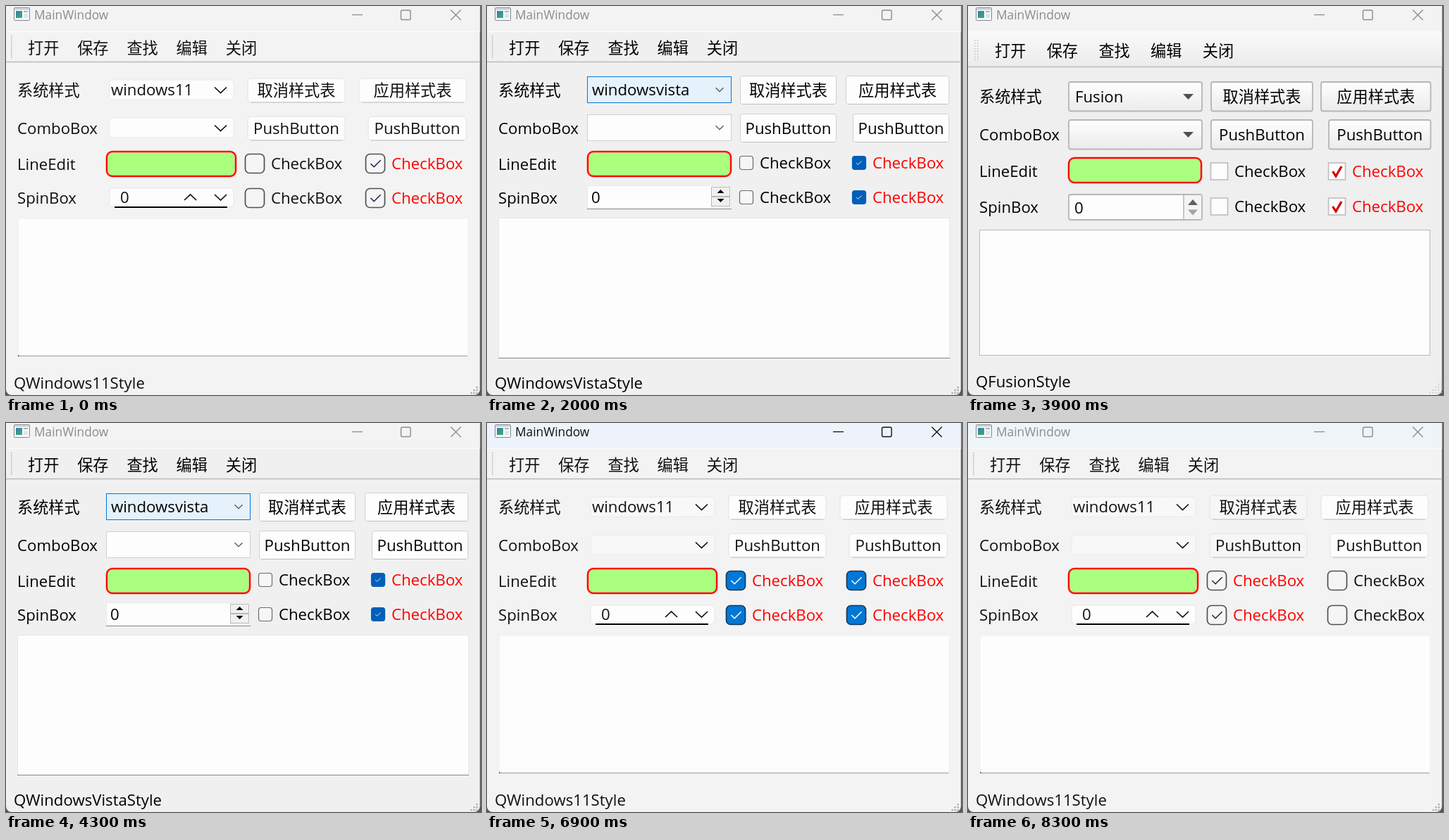
Write an HTML page that moves like this. It is 674 px wide and 553 px high and loops after 8.4 s.

```html
<!DOCTYPE html>
<html lang="zh-CN">
<head>
<meta charset="utf-8">
<title>MainWindow</title>
<style>
html, body { margin: 0; width: 100%; height: 100%; overflow: hidden; background: #555; }
svg { display: block; width: 674px; height: 553px; fill: none; }
text { font: 22.2px "Open Sans", "Noto Sans CJK SC", "Noto Sans CJK", sans-serif; }
.title { font-size: 17.3px; }
</style>
</head>
<body>
<svg id="stage" viewBox="0 0 674 553">
  <defs>
    <linearGradient id="raised" x2="0" y2="1"><stop stop-color="#fefefe"/><stop offset="1" stop-color="#ebebeb"/></linearGradient>
    <linearGradient id="bar" x2="0" y2="1"><stop stop-color="#fafafa"/><stop offset="1" stop-color="#ebebeb"/></linearGradient>
    <linearGradient id="icon" x2="1" y2="1"><stop stop-color="#3d78b4"/><stop offset="1" stop-color="#35b56a"/></linearGradient>
  </defs>
  <g id="view"></g>
</svg>
<script>
const LOOP = 8400;
const view = document.getElementById("view");
const RED = "#ff0000";

const rect = (x1, y1, x2, y2, fill, stroke = "none", r = 0, w = 1) =>
  `<rect x="${x1}" y="${y1}" width="${x2 - x1}" height="${y2 - y1}" rx="${r}" fill="${fill}" stroke="${stroke}" stroke-width="${w}"/>`;
const path = (d, stroke, w = 1.5, fill = "none") =>
  `<path d="${d}" stroke="${stroke}" stroke-width="${w}" fill="${fill}"/>`;
const text = (x, cy, s, fill, anchor = "start") =>
  `<text x="${x}" y="${cy + 8}" fill="${fill}" text-anchor="${anchor}">${s}</text>`;
const chevron = (cx, cy, w, h, color = "#111", lw = 1.7) =>
  path(`M${cx - w} ${cy - h}L${cx} ${cy + h}L${cx + w} ${cy - h}`, color, lw);
const triangle = (cx, cy, w, h, color) =>
  path(`M${cx - w} ${cy - h}H${cx + w}L${cx} ${cy + h}Z`, "none", 0, color);
const tick = (cx, cy, s, color, w = 1.5) =>
  path(`M${cx - 8 * s} ${cy}l${5 * s} ${5 * s}l${10 * s} ${-10 * s}`, color, w);

function dots(x, y, cols, rows, step, size, color, keep = () => true) {
  let d = "";
  for (let i = 0; i < cols; i++)
    for (let j = 0; j < rows; j++)
      if (keep(i, j)) d += `M${x + i * step} ${y + j * step}h${size}v${size}h${-size}z`;
  return path(d, "none", 0, color);
}

// Layout and painting rules of each widget style
const styles = {
  win11: {
    name: "windows11", status: "QWindows11Style", body: "#f3f3f3", ink: "#101010",
    rows: [120, 174, 225, 273], statusY: 536, menu: [31, 70.2, 60], lineY: 80,
    edit: [143, 207, 326, 242], comboText: [149, 119], spinText: [162, 272],
    checkX: [353, 524], checkY: [224, 273], labelX: [376, 547],
    buttons: [[343, 103, 481, 137], [501, 103, 653, 137], [343, 157, 481, 191], [514, 157, 653, 191]],
    button: ([x1, y1, x2, y2], i, s) =>
      rect(x1, y1, x2, y2, s.late && i % 2 === 0 ? "#f6f6f6" : "#fdfdfd", "#e2e2e2", 5) +
      path(`M${x1 + 4} ${y2}H${x2 - 4}`, "#c2c2c2", 1.2),
    combo: (i, s) => {
      const y = 105 + 54 * i;
      return rect(147, y, 323, y + 28, s.dimCombo ? "#f8f8f8" : "#fdfdfd", "#eaeaea", 5) + chevron(304.5, y + 14.5, 8.5, 4);
    },
    spin: () => rect(147, 259, 323, 286, "#fdfdfd", "#e6e6e6", 5) + path("M154 286H314", "#000", 2) +
      chevron(261.5, 272, 8.5, -4) + chevron(304.5, 272, 8.5, 4),
    check: (x, y, on, s, hover) => on && s.active
      ? rect(x - 13.5, y - 13.5, x + 13.5, y + 13.5, "#0078d7", "#173a5a", 6, 1.7) + tick(x + 1, y, .95, "#fff")
      : rect(x - 13.5, y - 13.5, x + 13.5, y + 13.5, hover ? "#e2e2e2" : "#f5f5f5", "#505050", 6, 1.7) +
        (on ? tick(x + 1, y, .95, s.late ? "#222" : "#1c1c50") : ""),
    area: () => rect(18, 303, 655, 497, "#fdfdfd") + path("M18 497.5H655", "#b4b4b4") + rect(17, 496.5, 18.5, 498, "#333")
  },
  vista: {
    name: "windowsvista", status: "QWindowsVistaStyle", body: "#f0f0f0", ink: "#000",
    rows: [120, 174, 225, 273], statusY: 536, menu: [31, 70.2, 60], lineY: 80,
    edit: [143, 207, 346, 242], comboText: [149, 119], spinText: [148, 272],
    checkX: [368, 528], checkY: [223, 272], labelX: [387, 547],
    buttons: [[359.5, 99.5, 495.5, 139.5], [509.5, 99.5, 655.5, 139.5], [359.5, 153.5, 495.5, 193.5], [519.5, 153.5, 655.5, 193.5]],
    button: ([x1, y1, x2, y2]) => rect(x1, y1, x2, y2, "#fdfdfd", "#d0d0d0", 3) +
      path(`M${x1 + 3} ${y2}H${x2 - 3}`, "#bdbdbd", 1),
    combo: i => {
      const y = 100.5 + 54 * i;
      return rect(142.5, y, 346.5, y + 37, i ? "#fdfdfd" : "#e5f1fb", i ? "#cfcfcf" : "#0078d7") +
        chevron(330, y + 18.5, 5.5, 2.7, "#505050", 1.2);
    },
    spin: () => rect(142.5, 255.5, 346.5, 288.5, "#fdfdfd", "#e8e8e8") + path("M142 288.5H347", "#868686", 1.2) +
      [0, 1].map(i => rect(318.5, 257.5 + 14 * i, 344.5, 270.5 + 14 * i, "#f0f0f0", "#b8b8b8") +
        triangle(331.5, 263.5 + 13 * i, 5, i ? 2.5 : -2.5, "#000")).join(""),
    check: (x, y, on) => rect(x - 9.5, y - 9.5, x + 9.5, y + 9.5, on ? "#005fb8" : "#f6f6f6", on ? "#005fb8" : "#6a6a6a", 3.5, 1.2) +
      (on ? tick(x, y, .5, "#d8e8f6", 1) : ""),
    area: () => rect(16.5, 301.5, 656.5, 500.5, "#fdfdfd", "#e5e5e5") + path("M16 500.5H657", "#868686", 1.2)
  },
  fusion: {
    name: "Fusion", status: "QFusionStyle", body: "#efefef", ink: "#000",
    rows: [129, 183, 235, 286], statusY: 534, menu: [38, 73.7, 64], lineY: 87,
    edit: [143, 216, 331, 251], comboText: [152, 129], spinText: [151, 287],
    checkX: [356.5, 523.5], checkY: [235, 285], labelX: [378, 545],
    buttons: [[345, 108, 489, 149.5], [501, 108, 656.5, 149.5], [345, 162, 489, 203.5], [512, 162, 656.5, 203.5]],
    button: ([x1, y1, x2, y2]) => rect(x1, y1, x2, y2, "url(#raised)", "#b6b6b6", 3, 1.8),
    combo: i => {
      const y = 108 + 54 * i;
      return rect(143, y, 332, y + 41.5, "url(#raised)", "#b6b6b6", 3, 1.8) + triangle(312.5, y + 21, 7.5, 4, "#505050");
    },
    spin: () => rect(143, 268, 332, 304, "#fdfdfd", "#b6b6b6", 3, 1.8) + rect(306, 269, 331, 303, "#f4f4f4") +
      path("M306 268V304", "#b6b6b6") + triangle(319, 279, 7, -4, "#606060") + triangle(319, 293.5, 7, 4, "#a4a4a4"),
    check: (x, y, on) => rect(x - 12, y - 12, x + 12, y + 12, "#fdfdfd", "#bdbdbd", 0, 1.6) +
      (on ? path(`M${x - 6} ${y}l4.5 7l8 -14`, "#d00000", 3.2) : ""),
    area: () => rect(16.5, 318.5, 655.5, 496.5, "#fdfdfd", "#b9b9b9")
  }
};

function titleBar({ active, late }) {
  const ink = active ? "#111" : "#8c8c8c";
  return rect(0, 0, 672.5, 36, active ? "#eef3fb" : late ? "#eff4f9" : "#f3f3f4") +
    rect(11.5, 2.5, 33.5, 20.5, "#fafafa", "#7d8590", 1) + path("M12 4.5H33", "#c4ccd4", 2) +
    rect(14, 7, 23, 17, "url(#icon)") + rect(25, 7, 31, 9, "#a8b4c4") + rect(25, 11, 31, 17, "#dfe5ec") +
    `<text class="title" x="40" y="19" fill="${ink}">MainWindow</text>` +
    path("M491 12.5H506", ink, 1.3) + rect(560.5, 6, 574, 19.5, "none", ink, 2, 1.4) +
    path("M631 5.5L645.5 20M645.5 5.5L631 20", ink, 1.4);
}

function toolBar(st, fusion) {
  const [x, pitch, y] = st.menu;
  return (fusion ? rect(0, 36, 672.5, 87, "url(#bar)") + dots(9, 48, 2, 8, 4, 1.5, "#bcbcbc")
                 : path("M0 36.5H672.5", "#fafafa", 1) + dots(7, 42, 1, 11, 3, 1.5, "#b0b0b0")) +
    path(`M0 ${st.lineY - .5}H672.5`, "#bbb", 1.7) +
    ["打开", "保存", "查找", "编辑", "关闭"].map((s, i) => text(x + pitch * i, y, s, st.ink)).join("");
}

function draw(s) {
  const st = styles[s.style], fusion = s.style === "fusion", ink = st.ink;
  const captions = ["取消样式表", "应用样式表", "PushButton", "PushButton"];
  let out = rect(0, -20, 672.5, 553, st.body, "none", 8) + titleBar(s) + toolBar(st, fusion);

  ["系统样式", "ComboBox", "LineEdit", "SpinBox"].forEach((label, i) => out += text(16, st.rows[i], label, ink));
  out += st.combo(0, s) + st.combo(1, s) + text(...st.comboText, st.name, ink);
  st.buttons.forEach((b, i) =>
    out += st.button(b, i, s) + text((b[0] + b[2]) / 2, st.rows[i >> 1], captions[i], ink, "middle"));
  out += rect(...st.edit, "#aaff7f", "#ff8c80", 8, 3.2) + rect(...st.edit, "none", RED, 8, 1.9);
  out += st.spin() + text(...st.spinText, "0", ink);

  s.checks.forEach((on, i) => {
    const col = i % 2, y = st.checkY[i >> 1];
    out += st.check(st.checkX[col], y, on, s, s.hover && i === 0) +
      text(st.labelX[col], y, "CheckBox", on ? RED : ink);
  });
  out += st.area() + text(11, st.statusY, st.status, ink);
  out += fusion ? dots(655, 533, 5, 5, 4, 1.5, "#c0c0c0", (i, j) => i + j > 3)
                : dots(659, 541, 3, 3, 4, 2.5, "#b4b4b4", (i, j) => i + j > 1);
  view.innerHTML = out;
}

function stateAt(t) {
  return {
    style: t < 900 ? "win11" : t < 2400 ? "vista" : t < 4200 ? "fusion" : t < 5100 ? "vista" : "win11",
    active: t >= 6300 && t < 7900,
    hover: t >= 5800 && t < 6300,
    dimCombo: t >= 5100,
    late: t >= 7900,
    checks: [t >= 6300, t < 7100, t >= 6600, t < 7400]
  };
}

let shown = "";
function frame(now) {
  const state = stateAt(now % LOOP), key = JSON.stringify(state);
  if (key !== shown) draw(state);
  shown = key;
  requestAnimationFrame(frame);
}
frame(0);
</script>
</body>
</html>
```
